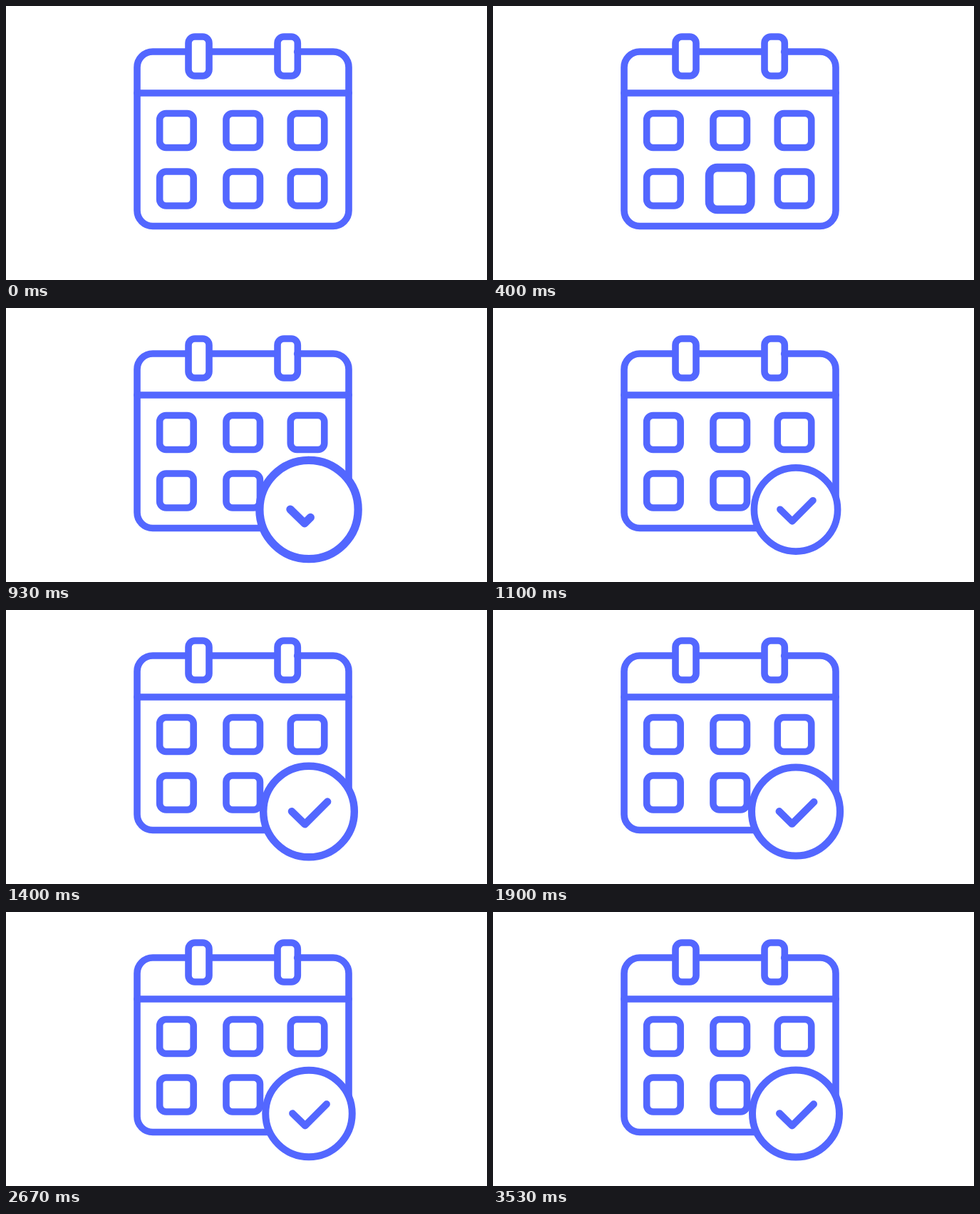
An HTML page with a canvas for the animation above (3560 ms loop, 675 px wide and 384 px high).

```html
<!DOCTYPE html>
<html lang="en">
<head>
<meta charset="utf-8">
<title>Calendar check</title>
<style>
  html, body { margin: 0; width: 100%; height: 100%; overflow: hidden; background: #fff; }
  canvas { display: block; }
</style>
</head>
<body>
<canvas id="stage" width="675" height="384"></canvas>
<script>
const ctx = document.getElementById('stage').getContext('2d');
const BLUE = '#5367ff';
const LOOP = 3560;
const FPS = 30;
const BADGE = { x: 425, y: 282.5, r: 61 };

const progress = (t, from, to) => Math.min(1, Math.max(0, (t - from) / (to - from)));
const ease = p => p * p * (3 - 2 * p);

function roundBox(x, y, w, h, r, filled) {
  ctx.beginPath();
  ctx.roundRect(x, y, w, h, r);
  if (filled) ctx.fill();
  ctx.stroke();
}

function scaledAbout(x, y, scale, draw) {
  ctx.save();
  ctx.translate(x, y);
  ctx.scale(scale, scale);
  draw();
  ctx.restore();
}

function drawDay(x, y, scale = 1) {
  scaledAbout(x, y, scale, () => roundBox(-23.75, -24, 47.5, 48, 9));
}

// Swell to 1.25 and back again
function dayPulse(t, start) {
  const p = progress(t, start, start + 250);
  return 1 + 0.25 * ease(1 - Math.abs(2 * p - 1));
}

function drawCalendar(t) {
  ctx.lineWidth = 9.6;
  roundBox(184, 64, 297, 244.5, 22);
  ctx.beginPath();
  ctx.moveTo(184, 122);
  ctx.lineTo(481, 122);
  ctx.stroke();

  roundBox(256, 43, 29, 55, 9, true);
  roundBox(381, 43, 28.3, 55, 9, true);
  ctx.beginPath();
  ctx.arc(408.7, 64.2, 4.8, 0, Math.PI * 2);
  ctx.fillStyle = BLUE;
  ctx.fill();
  ctx.fillStyle = '#fff';

  [239.4, 332.7, 423].forEach((x, i) => {
    drawDay(x, 174.5);
    drawDay(x, 256, i < 2 ? dayPulse(t, i * 250) : 1);
  });
}

// Grow, drop, then ring out as a damped 2 Hz wave
function badgeScale(t) {
  const top = 867, settle = 1067;
  if (t < top) return 1 + 0.2 * ease(progress(t, 500, top));
  if (t < settle) return 1.2 - 0.2 * progress(t, top, settle);
  const s = (t - settle) / 1000;
  return 1 - 0.104 * Math.exp(-2 * s) * Math.sin(4 * Math.PI * s);
}

function drawCheck(amount) {
  if (amount <= 0) return;
  const points = [[-23, -0.3], [-5.3, 17], [25, -13.3]];
  const [a, b, c] = points;
  const first = Math.hypot(b[0] - a[0], b[1] - a[1]);
  const second = Math.hypot(c[0] - b[0], c[1] - b[1]);
  const length = amount * (first + second);
  const mix = (p, q, k) => [p[0] + (q[0] - p[0]) * k, p[1] + (q[1] - p[1]) * k];
  ctx.beginPath();
  ctx.moveTo(...a);
  ctx.lineTo(...mix(a, b, Math.min(1, length / first)));
  if (length > first) ctx.lineTo(...mix(b, c, (length - first) / second));
  ctx.stroke();
}

function drawBadge(t) {
  const sweep = ease(progress(t, 500, 944));
  if (sweep <= 0) return;
  scaledAbout(BADGE.x, BADGE.y, badgeScale(t), () => {
    ctx.lineWidth = 10;
    ctx.beginPath();
    ctx.arc(0, 0, BADGE.r, -Math.PI / 2, (2 * sweep - 0.5) * Math.PI);
    ctx.fill();
    ctx.stroke();
    drawCheck(ease(progress(t, 800, 1060)));
  });
}

function render(now) {
  const step = Math.floor((now % LOOP) * FPS / 1000 + 0.11);
  const t = step * 1000 / FPS;
  ctx.fillStyle = '#fff';
  ctx.fillRect(0, 0, 675, 384);
  ctx.strokeStyle = BLUE;
  ctx.lineCap = ctx.lineJoin = 'round';
  drawCalendar(t);
  drawBadge(t);
}

const start = performance.now();
function tick() {
  render(performance.now() - start);
  requestAnimationFrame(tick);
}
tick();
</script>
</body>
</html>
```
